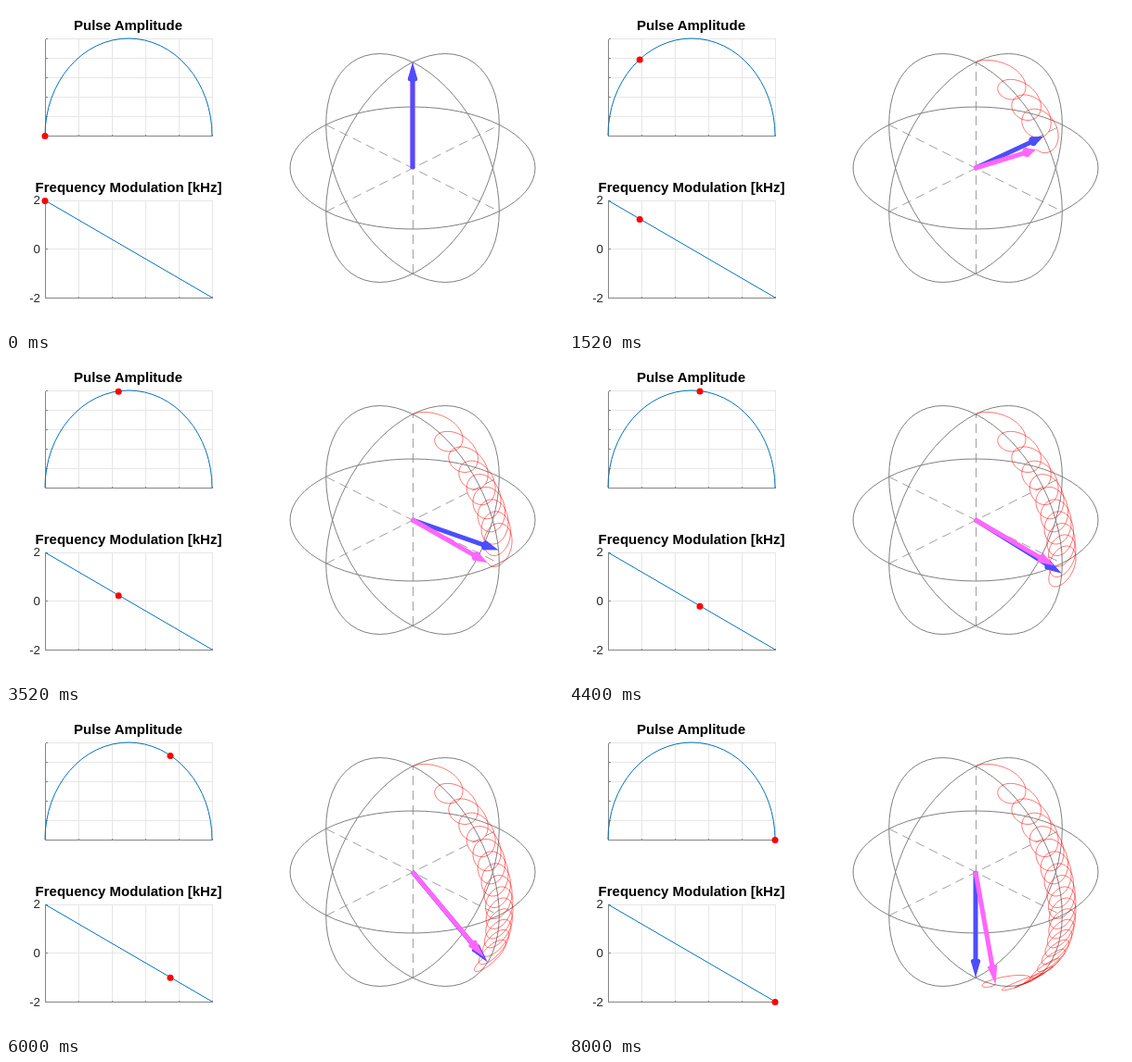
These frames come from a looping animation (600 px wide and 350 px high, 8080 ms). An HTML page with a canvas:

```html
<!DOCTYPE html>
<html lang="en">
<head>
<meta charset="utf-8">
<title>Adiabatic pulse</title>
<style>
  html, body { margin: 0; width: 100%; height: 100%; overflow: hidden; background: #fff; }
  svg, canvas { position: absolute; left: 0; top: 0; width: 600px; height: 350px; }
  text { font: 13.33px Arial, "Liberation Sans", sans-serif; fill: #262626; text-anchor: end; }
  .title { font-weight: bold; font-size: 15px; fill: #000; text-anchor: middle; }
  path, circle, ellipse { fill: none; stroke-width: 1; vector-effect: non-scaling-stroke; }
  .grid { stroke: #e6e6e6; shape-rendering: crispEdges; }
  .axis { stroke: #858585; shape-rendering: crispEdges; }
  .curve { stroke: #0072bd; }
  .sphere { stroke: #808080; }
  .dash { stroke: #a0a0a0; stroke-dasharray: 10 6; }
</style>
</head>
<body>
<svg viewBox="0 0 600 350">
  <g transform="translate(.5 .5)">
    <path class="grid" d="M78 35V140M114 35V140M150 35V140M186 35V140M222 35V140M42 35H222M42 56H222M42 77H222M42 98H222M42 119H222"/>
    <path class="axis" d="M42 35V140H222M78 140v-2M114 140v-2M150 140v-2M186 140v-2M222 140v-2M42 35h2M42 56h2M42 77h2M42 98h2M42 119h2"/>
    <path class="grid" d="M78 210V315M114 210V315M150 210V315M186 210V315M222 210V315M42 210H222M42 262H222"/>
    <path class="axis" d="M42 210V315H222M78 315v-2M114 315v-2M150 315v-2M186 315v-2M222 315v-2M42 210h2M42 262h2"/>
  </g>
  <path class="curve" d="M42 140A90 105 0 0 1 222 140M42 210L222 315"/>
  <text class="title" x="131.5" y="26">Pulse Amplitude</text>
  <text class="title" x="132" y="201">Frequency Modulation [kHz]</text>
  <text x="37" y="214">2</text>
  <text x="37" y="267">0</text>
  <text x="37" y="320">-2</text>
  <path class="dash" d="M345 128.5L531.5 222M345 222L531.5 128.5M438.5 289V61"/>
  <g class="sphere">
    <ellipse cx="438" cy="175" rx="132" ry="66"/>
    <circle r="1" transform="matrix(93.3 46.7 0 -114.3 438 175)"/>
    <circle r="1" transform="matrix(93.3 -46.7 0 -114.3 438 175)"/>
  </g>
</svg>
<canvas width="600" height="350"></canvas>
<script>
const ctx = document.querySelector('canvas').getContext('2d');
const STEP_MS = 80, STEPS = 100, SUB = 60;
const TURNS = 20;               // precession turns during the whole pulse
const RADIUS = 132, ORIGIN = [438, 175];
const COS30 = Math.sqrt(3) / 2;

// Vectors are [a, b, z]: a points front right, b back right, z up.
const project = ([a, b, z]) => [
  ORIGIN[0] + RADIUS * (a + b) * Math.SQRT1_2,
  ORIGIN[1] + RADIUS * ((a - b) * Math.SQRT1_2 / 2 - z * COS30)
];
const depth = ([a, b, z]) => (a - b) * Math.SQRT1_2 * COS30 + z / 2;

const amplitude = u => Math.sqrt(Math.max(0, 1 - (1 - 2 * u) ** 2));
const field = u => [amplitude(u), 0, 1 - 2 * u];

// Rotate v about unit axis n (Rodrigues).
function rotate(v, n, angle) {
  const c = Math.cos(angle), s = Math.sin(angle);
  const dot = n[0] * v[0] + n[1] * v[1] + n[2] * v[2];
  const cross = [
    n[1] * v[2] - n[2] * v[1],
    n[2] * v[0] - n[0] * v[2],
    n[0] * v[1] - n[1] * v[0]
  ];
  return v.map((x, i) => x * c + cross[i] * s + n[i] * dot * (1 - c));
}

// Magnetisation precessing about the effective field.
const spins = [[0, 0, 1]];
const total = STEPS * SUB;
for (let i = 0; i < total; i++) {
  spins.push(rotate(spins[i], field((i + 0.5) / total), -2 * Math.PI * TURNS / total));
}
const trail = spins.map(project);

function drawArrow({ v, color }) {
  const tip = project(v);
  const neck = project(v.map(x => x * 0.84));
  const angle = Math.atan2(tip[1] - ORIGIN[1], tip[0] - ORIGIN[0]);
  const tilt = Math.abs(depth(v));
  const nx = -Math.sin(angle), ny = Math.cos(angle);
  const disc = ([x, y], r) => {
    ctx.beginPath();
    ctx.ellipse(x, y, r * tilt, r, angle, 0, 2 * Math.PI);
    ctx.fill();
  };
  ctx.fillStyle = ctx.strokeStyle = color;
  ctx.lineWidth = 5;
  ctx.beginPath();
  ctx.moveTo(...ORIGIN);
  ctx.lineTo(...neck);
  ctx.stroke();
  disc(ORIGIN, 2.5);
  disc(neck, 5.2);
  ctx.beginPath();
  ctx.moveTo(...tip);
  ctx.lineTo(neck[0] + nx * 5.2, neck[1] + ny * 5.2);
  ctx.lineTo(neck[0] - nx * 5.2, neck[1] - ny * 5.2);
  ctx.fill();
}

function drawDot(x, y) {
  ctx.fillStyle = '#f00';
  ctx.beginPath();
  ctx.arc(x, y, 3.5, 0, 2 * Math.PI);
  ctx.fill();
}

function draw(step) {
  const u = step / STEPS;
  ctx.clearRect(0, 0, 600, 350);

  ctx.strokeStyle = 'rgba(255, 0, 0, .55)';
  ctx.lineWidth = 1;
  ctx.lineJoin = 'round';
  ctx.beginPath();
  for (let i = 0; i <= step * SUB; i += 4) ctx.lineTo(...trail[i]);
  ctx.stroke();

  // The arrow nearer to the viewer goes on top.
  const arrows = [
    { v: spins[step * SUB], color: '#ff66ff' },
    { v: field(u), color: '#4d4dff' }
  ];
  arrows.sort((p, q) => depth(p.v) - depth(q.v)).forEach(drawArrow);

  const x = 42 + 180 * u;
  drawDot(x, 140.5 - 105 * amplitude(u));
  drawDot(x, 210.5 + 105 * u);
}

let shown = -1;
function tick() {
  const step = Math.floor(performance.now() / STEP_MS) % (STEPS + 1);
  if (step !== shown) draw(shown = step);
  requestAnimationFrame(tick);
}
tick();
</script>
</body>
</html>
```
